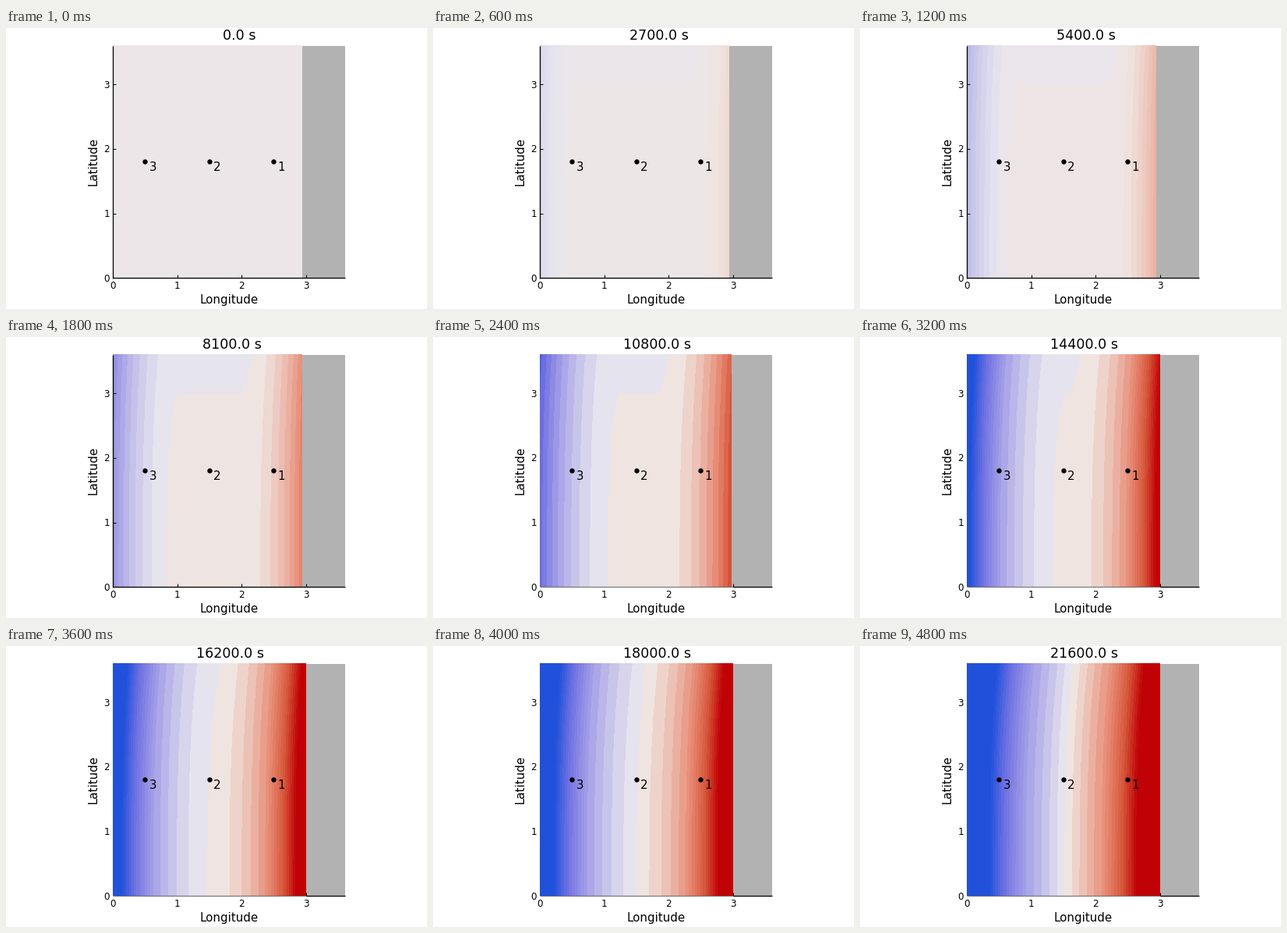
A matplotlib script that plays this animation: 540 by 360 pixels, repeating every 5000 ms.

```python
import numpy as np
import matplotlib.pyplot as plt
from matplotlib.animation import FuncAnimation
from matplotlib.colors import LinearSegmentedColormap

W, H, DPI = 540, 360, 72
FRAMES, INTERVAL, STEP_SECONDS = 25, 200, 900
X0, Y0, UNIT, SIZE = 136.9, 320.2, 82.6, 3.6
SHORE = 3.0
CALM, FLOOD = 2, 12  # last step at rest, first step with the shore moving

plt.rcParams["font.family"] = "DejaVu Sans"

CMAP = LinearSegmentedColormap.from_list("surge", [
    (0, "#2151db"), (0.125, "#6f71e2"), (0.25, "#9d98e6"), (0.475, "#e5e3ee"),
    (0.5, "#ece7e9"),
    (0.525, "#f0e4e0"), (0.75, "#e88b75"), (0.875, "#d7573b"), (1, "#c00206"),
], N=1024)


def wet_edge(n):
    return min(SHORE, 2.94 + 0.03 * max(0, n - FLOOD + 1))


def setup(distance, reach):
    """Pile-up at a wall, fading quadratically over its reach."""
    return np.maximum(0, 1 - distance / reach) ** 2


def surface(n, edge):
    """Banded surface level on a fine grid, top row first."""
    x = np.linspace(0, edge, round(2 * edge * UNIT))
    y = np.linspace(1, 0, round(2 * SIZE * UNIT))[:, None]
    if n <= CALM:
        return np.zeros((y.size, x.size))
    wind = 1.5 * np.sin(np.pi / 2 * n / 27) ** 1.5
    reach = 0.35 + 0.073 * n
    x = x - 0.004 * n * y ** 3
    level = wind * (setup(edge - x, 0.95 * reach) - setup(x, reach))
    level += min(1, n / 9) * (0.015 - 0.026 * y ** 3)
    level = np.clip(level, -1, 1)
    step = min(0.09, wind / 7.5)
    if n > FLOOD:
        step = np.where(np.abs(level) > 0.45, step / 2, step)
    bands = (np.floor(level / step) + 0.5) * step
    return np.where(np.abs(level) == 1, level, bands)


def px(x):
    return X0 + UNIT * x


def py(y):
    return Y0 - UNIT * y


fig = plt.figure(figsize=(W / DPI, H / DPI), dpi=DPI, facecolor="white")
ax = fig.add_axes([0, 0, 1, 1])
ax.set_axis_off()

top, right = py(SIZE), px(SIZE) + 0.3
ax.add_patch(plt.Rectangle((X0, top), right - X0, Y0 - top, color="#b2b2b2", lw=0))
water = ax.imshow(np.zeros((2, 2)), cmap=CMAP, vmin=-1, vmax=1, aspect="auto",
                  interpolation="nearest", zorder=1)
ax.set(xlim=(0, W), ylim=(H, 0))


def line(xs, ys, width=1.3):
    return ax.plot(xs, ys, color="black", lw=width, zorder=3,
                   solid_capstyle="butt")[0]


bottom_spine = line([X0, px(SHORE)], [Y0, Y0])
line([px(SHORE), right], [Y0, Y0])
covered = [line([X0, X0], [top, Y0 + 0.6])]
for k in range(4):
    x_tick = line([px(k)] * 2, [Y0, Y0 - 4.5], 1)
    covered.append(line([X0, X0 + 4.5], [py(k)] * 2, 1))
    if k < SHORE:
        covered.append(x_tick)
    ax.text(px(k), 334.3, str(k), size=12, ha="center", va="baseline")
    ax.text(133, py(k) + 4.4, str(k), size=12, ha="right", va="baseline")

for k in (1, 2, 3):
    x = px(3.5 - k)
    ax.plot(x - 0.2, py(1.8) - 0.2, "o", color="black", ms=6.4, mew=0, zorder=4)
    ax.text(x + 5.3, 183.2, str(k), size=15, va="baseline", zorder=4)

ax.text(286, 353, "Longitude", size=15, ha="center", va="baseline")
ax.text(119.5, 171.5, "Latitude", size=15, rotation=90, ha="right", va="center")
title = ax.text(278, 15, "", size=17.5, va="baseline")


def update(n):
    edge = wet_edge(n)
    water.set_data(surface(n, edge))
    water.set_extent((X0, px(edge), Y0, top))
    seconds = f"{n * STEP_SECONDS:.1f}"
    title.set_text(f"{seconds} s")
    title.set_x(278 - 8.5 * (len(seconds) - 3))
    bottom_spine.set_alpha(1 if n < FLOOD else 0.5)
    for part in covered:
        part.set_visible(n < FLOOD)
    return water, title


anim = FuncAnimation(fig, update, frames=FRAMES, interval=INTERVAL,
                     repeat=True, repeat_delay=0, blit=False)
plt.show()
```
